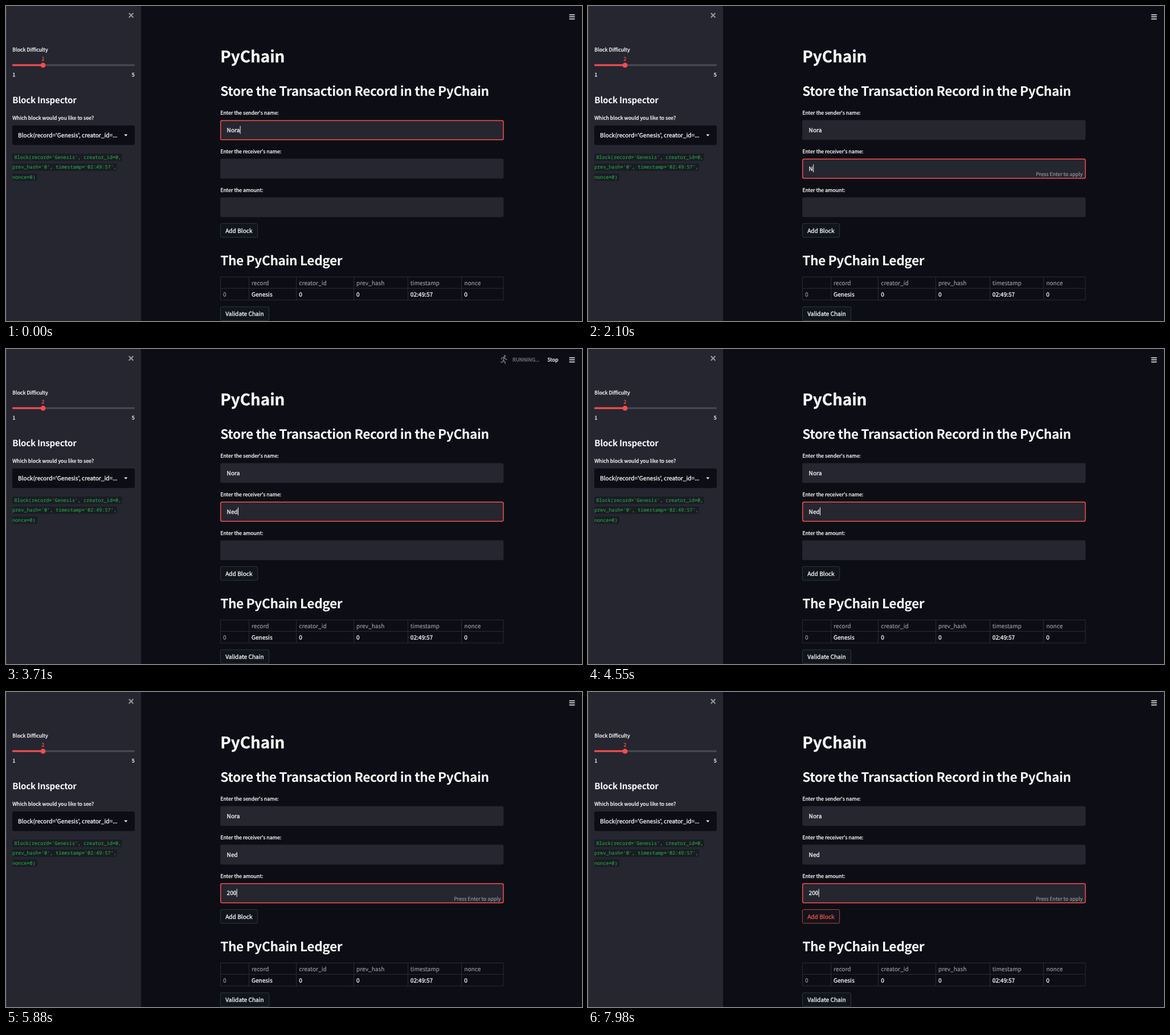
Animation of 1011 by 554 pixels, one loop 8000 ms. Source, as an HTML page:

```html
<!DOCTYPE html>
<html lang="en">
<head>
<meta charset="utf-8">
<title>PyChain</title>
<style>
html, body { margin: 0; width: 100%; height: 100%; overflow: hidden; background: #0d0e15; }
svg { display: block; }
text {
  font: 10.15px "Noto Sans CJK JP", "Noto Sans CJK SC", "Noto Sans", sans-serif;
  color: #fafafa; fill: currentColor; stroke: currentColor; stroke-width: .3;
  white-space: pre; text-rendering: geometricPrecision;
}
text.label { font-size: 8.88px; }
text.title { font-size: 27.8px; font-weight: 700; }
text.head { font-size: 22.7px; font-weight: 600; letter-spacing: -.4px; stroke: none; }
text.side { font-size: 15.2px; font-weight: 600; letter-spacing: -.25px; stroke: none; }
text.dim { color: #9b9ca1; stroke-width: .15; }
text.busy { color: #77787d; }
text.code { font: 8.46px "Noto Sans Mono", "DejaVu Sans Mono", monospace; color: #27a343; stroke-width: .15; }
text.red { color: #f94c4c; }
.red { fill: #f94c4c; }
.box { fill: #252630; }
.ring { fill: none; stroke: #f94c4c; stroke-width: 1.5; }
.chip { fill: #1a1c24; }
.button rect { fill: #10151b; stroke: #3c4047; stroke-width: .8; }
.button.hover rect { stroke: #f94c4c; }
.button.hover text { color: #f94c4c; }
.grid { fill: none; stroke: #2b2c33; }
</style>
</head>
<body>
<svg width="1011" height="554" viewBox="0 0 1011 554">
  <rect class="box" width="237" height="554"/>
  <rect width="1" height="554" fill="#3d3e47"/>
  <path d="M215.8 12.6l7.6 7.6m0-7.6l-7.6 7.6" stroke="#96979c" stroke-width="2.1"/>

  <text class="label" x="11.3" y="80">Block Difficulty</text>
  <text class="label red" x="65" y="96" text-anchor="middle">2</text>
  <rect x="11" y="102.6" width="215" height="3" rx="1.4" fill="#494a54"/>
  <rect class="red" x="11" y="102.6" width="54" height="3" rx="1.4"/>
  <circle class="red" cx="65" cy="104.2" r="4.4"/>
  <text class="label" x="11.5" y="124">1</text>
  <text class="label" x="225.7" y="124" text-anchor="end">5</text>

  <text class="side" x="11.3" y="171">Block Inspector</text>
  <text class="label" x="11.3" y="200">Which block would you like to see?</text>
  <rect x="11" y="210" width="215" height="34.5" rx="3" fill="#0d0e15"/>
  <text x="21" y="231">Block(record='Genesis', creator_id=...</text>
  <path d="M207.3 225.8h6l-3 3.2z" fill="#fafafa"/>

  <rect class="chip" x="11" y="259.5" width="193" height="13" rx="2"/>
  <rect class="chip" x="11" y="277" width="184" height="13" rx="2"/>
  <rect class="chip" x="11" y="294.5" width="44" height="13" rx="2"/>
  <text class="code" x="14.5" y="268.8">Block(record='Genesis', creator_id=0,</text>
  <text class="code" x="11.2" y="286.3">prev_hash='0', timestamp='02:49:57',</text>
  <text class="code" x="11.2" y="303.8">nonce=0)</text>

  <g id="status">
    <circle cx="875.6" cy="12.3" r="1.7" fill="#77787d"/>
    <path d="M869.3 18.2l1.2-2.7 3.8-1.2 2 3.2 3.2 1.2M874.2 15l-1.3 5 2.9 2.3.2 4M873 20.2l-1.3 2.8-3.5.6"
      fill="none" stroke="#77787d" stroke-width="1.5"/>
    <text class="label busy" x="889" y="22">RUNNING...</text>
    <text class="label" x="950.3" y="22">Stop</text>
  </g>
  <path d="M988.6 15.4h9.8m-9.8 3.7h9.8m-9.8 3.7h9.8" stroke="#fafafa" stroke-width="1.5"/>

  <text class="title" x="376.2" y="99">PyChain</text>
  <text class="head" x="376.2" y="158">Store the Transaction Record in the PyChain</text>
  <g id="form"></g>
  <rect id="caret" width="1" height="14" fill="#fafafa"/>

  <g class="button" id="add">
    <rect x="376.4" y="382.6" width="65.2" height="24.2" rx="2.5"/>
    <text x="385.2" y="398.7">Add Block</text>
  </g>

  <text class="head" x="376.2" y="455.5">The PyChain Ledger</text>
  <path class="grid" d="M376.5 476.5h496.5v40.5h-496.5zM376.5 496.5h496.5M426.5 476.5v40.5M509.5 476.5v40.5M610.5 476.5v40.5M705.5 476.5v40.5M799.5 476.5v40.5"/>
  <g id="ledger"></g>

  <g class="button">
    <rect x="376.4" y="529" width="85.2" height="24.2" rx="2.5"/>
    <text x="385.2" y="545">Validate Chain</text>
  </g>
</svg>
<script>
const LOOP = 8000, TICK = 70;
const $ = id => document.getElementById(id);
const clamp = v => Math.min(1, Math.max(0, v));

// keys: [time, typed text]; focus and blur: [start, end] of the border fade
const fields = [
  { label: "Enter the sender's name:", y: 201, keys: [[0, "Nora"]], focus: [-2, -1], blur: [1120, 1330] },
  { label: "Enter the receiver's name:", y: 268.8, keys: [[2100, "N"], [2240, "Ne"], [2450, "Ned"]],
    focus: [1120, 1330], blur: [5040, 5320], hint: [2100, 3500] },
  { label: "Enter the amount:", y: 336.6, keys: [[5460, "2"], [5670, "20"], [5880, "200"]],
    focus: [5040, 5320], blur: [9000, 9001], hint: [5460, LOOP] }
];
const caretOff = [[490, 980], [1680, 2100], [3010, 3500], [4060, 4550], [6440, 6930], [7490, 7980]];

$("form").innerHTML = fields.map(({ label, y }) => `
  <text class="label" x="376.2" y="${y - 10}">${label}</text>
  <rect class="box" x="376" y="${y - .2}" width="497.4" height="34.8" rx="3"/>
  <rect class="ring" x="376.7" y="${y + .4}" width="496.2" height="33.8" rx="2.5"/>
  <text class="value" x="387.6" y="${y + 20.8}"></text>
  <text class="label dim hint" x="868.3" y="${y + 30}" text-anchor="end">Press Enter to apply</text>`).join("");

const columns = [[381, "", "0"], [431, "record", "Genesis"], [514.3, "creator_id", "0"],
  [615, "prev_hash", "0"], [709.8, "timestamp", "02:49:57"], [804.3, "nonce", "0"]];
$("ledger").innerHTML = columns.map(([x, name, value], i) => `
  <text class="dim" x="${x}" y="490.7">${name}</text>
  <text class="${i ? "" : "dim"}" x="${x}" y="511">${value}</text>`).join("");

const [rings, values, hints] = ["ring", "value", "hint"].map(c => document.getElementsByClassName(c));
const within = (t, [from, to]) => t >= from && t < to;
const progress = (t, [from, to]) => clamp((t - from) / (to - from));
const show = (el, alpha) => el.setAttribute("opacity", +alpha);

function draw(time) {
  const t = Math.floor(time / TICK) * TICK;
  let active = 0;
  fields.forEach((f, i) => {
    const fadeIn = 1 - (1 - progress(t, f.focus)) ** 3;
    show(rings[i], fadeIn * (1 - progress(t, f.blur)));
    show(hints[i], f.hint ? within(t, f.hint) : 0);
    const key = f.keys.filter(k => t >= k[0]).pop();
    values[i].textContent = key ? key[1] : "";
    if (t > f.focus[0]) active = i;
  });
  $("caret").setAttribute("x", 387.8 + values[active].getComputedTextLength());
  $("caret").setAttribute("y", fields[active].y + 9.8);
  show($("caret"), !caretOff.some(span => within(t, span)));
  show($("status"), within(t, [3570, 3850]));
  $("add").classList.toggle("hover", t >= 7700);
}

function frame(now) {
  draw(now % LOOP);
  requestAnimationFrame(frame);
}
draw(0);
requestAnimationFrame(frame);
</script>
</body>
</html>
```
